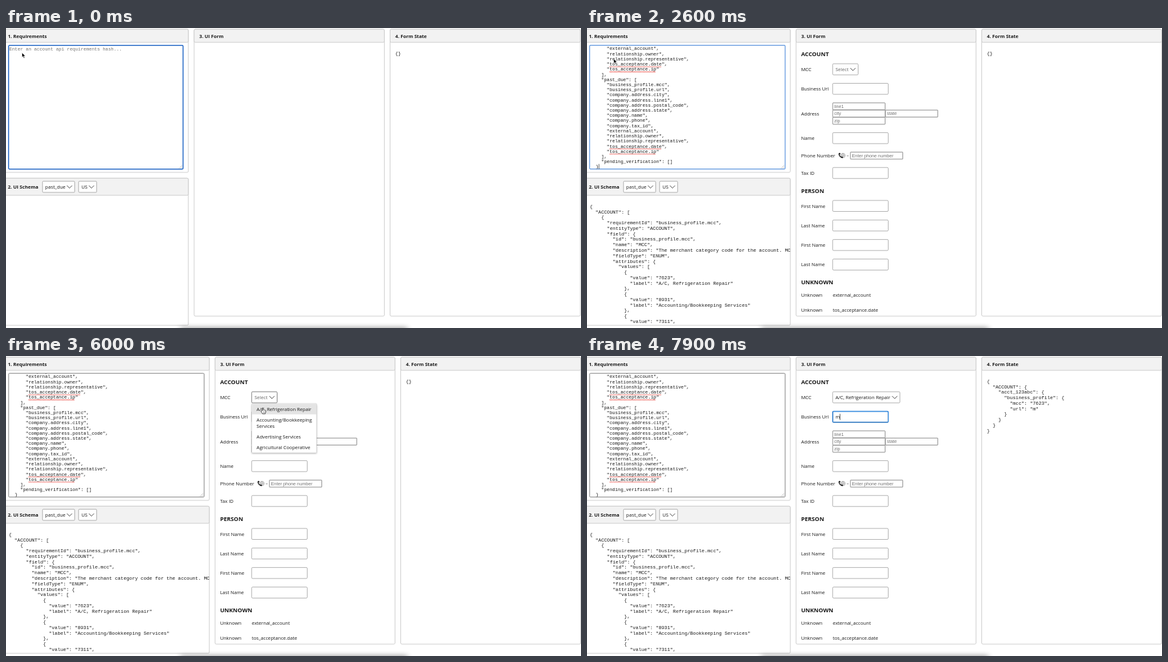
Write an HTML page that moves like this. It is 917 by 480 pixels and loops after 8000 ms.

```html
<!DOCTYPE html>
<html lang="en">
<head>
<meta charset="utf-8">
<title>Requirements form</title>
<style>
html, body { margin: 0; width: 100%; height: 100%; overflow: hidden; background: #fff; }
svg { display: block; width: 917px; height: 480px; }
text { white-space: pre; font: 7.63px "Open Sans", "Noto Sans", sans-serif; fill: #1a1a1a; }
.b { font-weight: 700; }
.h { font-weight: 700; font-size: 9.16px; }
.m { font-family: "Liberation Mono", monospace; }
.ta { font-size: 7.3px; }
.p { font: 7.27px "Liberation Sans", sans-serif; fill: #757575; }
.g { fill: #666; }
</style>
</head>
<body>
<svg id="stage" viewBox="0 0 917 480" xmlns="http://www.w3.org/2000/svg">
<defs>
  <clipPath id="areaClip"><rect x="4.5" y="28.2" width="311" height="197.3"/></clipPath>
  <clipPath id="schemaClip"><rect x="0" y="268" width="324" height="207.3"/></clipPath>
  <filter id="blur" x="-20%" y="-200%" width="140%" height="500%"><feGaussianBlur stdDeviation="5 3.5"/></filter>
  <filter id="soft" x="-10%" y="-10%" width="120%" height="125%"><feGaussianBlur stdDeviation="1.6"/></filter>
</defs>
</svg>
<script>
const LOOP = 8000;
const stage = document.getElementById("stage");

function add(parent, tag, attrs, content) {
  const el = document.createElementNS("http://www.w3.org/2000/svg", tag);
  for (const k in attrs) el.setAttribute(k, attrs[k]);
  if (content !== undefined) el.textContent = content;
  parent.appendChild(el);
  return el;
}
const group = (parent, attrs = {}) => add(parent, "g", attrs);
const text = (parent, x, y, s, cls = "") => add(parent, "text", { x, y, class: cls }, s);
const path = (parent, d, attrs) => add(parent, "path", Object.assign({ d, fill: "none" }, attrs));
const box = (parent, x, y, width, height, stroke, sw = 0.7, rx = 1.5, fill = "#fff") =>
  add(parent, "rect", { x, y, width, height, stroke, "stroke-width": sw, rx, fill });
const show = (el, on) => el.setAttribute("visibility", on ? "visible" : "hidden");
const fade = (el, o) => el.setAttribute("opacity", o);
const ramp = (t, a, b) => Math.max(0, Math.min(1, (t - a) / (b - a)));

function lines(parent, x, y, step, list, cls) {
  list.forEach((s, i) => text(parent, x, y + i * step, s, cls));
}

function panel(parent, x, y, w, h, head, title) {
  box(parent, x, y, w, h, "#c8c8c8", 0.9, 2);
  box(parent, x, y, w, head, "#c8c8c8", 0.9, 2, "#f2f2f2");
  text(parent, Math.max(x, -4) + 8.3 - (x < 0 ? 3.3 : 0), y + head / 2 + 3, title, "b");
}

function select(parent, x, y, w, label, cls) {
  const g = group(parent);
  const frame = box(g, x, y, w, 17.8, "#8c8c8c");
  text(g, x + 4.4, y + 11.7, label, cls);
  path(g, `M${x + w - 12.4} ${y + 6.9}l4.1 4.1 4.1-4.1`, { stroke: "#333", "stroke-width": 0.9 });
  return { g, frame };
}

function plainInput(parent, x, y, label) {
  box(parent, x, y, 83.5, 11.2, "#6e6e6e", 0.8, 0.5);
  text(parent, x + 2.4, y + 8.1, label, "p");
}

function grip(parent, x) {
  path(parent, `M${x - 6} 224.6l5-5M${x - 3.2} 224.6l2.2-2.2`, { stroke: "#999", "stroke-width": 0.6 });
}

// Layout shared by both views: left panel edge and the two right panels
function layout(parent, edge, x3, x4, w) {
  panel(parent, -2, 2, edge + 2, 229, 21, "1. Requirements");
  panel(parent, -2, 240.3, edge + 2, 235.4, 27.4, "2. UI Schema");
  select(parent, 58.2, 245.2, 51.4, "past_due");
  select(parent, 115.8, 245.2, 28.8, "US");
  panel(parent, x3, 2, w, 459, 21, "3. UI Form");
  panel(parent, x4, 2, w, 459, 21, "4. Form State");
}

// Empty view
const empty = group(stage);
layout(empty, 290.8, 300, 612.5, 303.4);
box(empty, 4.2, 27.7, 278.2, 198, "#1d63c4", 1.5, 1.5);
grip(empty, 282);
text(empty, 5.3, 35.8, "Enter an account api requirements hash...", "m ta p0").style.fill = "#757575";
text(empty, 620.8, 42.8, "{}", "m");
const caret0 = add(empty, "rect", { x: 5, y: 29.2, width: 0.7, height: 8.6, fill: "#111" });

// Filled view
const full = group(stage);
layout(full, 324.2, 333.4, 629.5, 287);
const area = box(full, 4.2, 27.7, 311.8, 198, "#777", 0.9, 1.5);
grip(full, 315.6);

const keys = [
  "business_profile.mcc", "business_profile.url", "company.address.city", "company.address.line1",
  "company.address.postal_code", "company.address.state", "company.name", "company.phone",
  "company.tax_id", "external_account", "relationship.owner", "relationship.representative",
  "tos_acceptance.date", "tos_acceptance.ip"
].map((s, i, a) => `      "${s}"${i < a.length - 1 ? "," : ""}`);
const areaText = group(full, { "clip-path": "url(#areaClip)" });
const areaStep = 8.22, areaTop = 35.4;
lines(areaText, 5.3, areaTop - areaStep, areaStep, [
  ...keys.slice(8), "    ],", '    "past_due": [', ...keys, "    ],", '    "pending_verification": []', "  }"
], "m ta");
const caret1 = add(full, "rect", { x: 18.7, y: 217.6, width: 0.7, height: 8, fill: "#111" });
const thumb = add(full, "rect", { x: 310.4, y: 133.5, width: 4.2, height: 82, rx: 2.1, fill: "#000" });

const spelling = group(full);
[[3, 19], [4, 17], [19, 19], [20, 17]].forEach(([row, n]) => {
  const y = areaTop + row * areaStep + 1.9;
  path(spelling, `M36.6 ${y}h${n * 4.38 - 1.5}`, {
    stroke: "#e8281e", "stroke-width": 1.15, "stroke-linecap": "round", "stroke-dasharray": "0.6 1.7"
  });
});

const schema = group(full, { "clip-path": "url(#schemaClip)" });
const entry = (code, label) => [
  "          {", `            "value": "${code}",`, `            "label": "${label}"`, "          },"
];
lines(schema, 4.4, 287.9, 8.76, [
  "{", '  "ACCOUNT": [', "    {",
  '      "requirementId": "business_profile.mcc",',
  '      "entityType": "ACCOUNT",',
  '      "field": {',
  '        "id": "business_profile.mcc",',
  '        "name": "MCC",',
  '        "description": "The merchant category code for the account. MCCs are used',
  '        "fieldType": "ENUM",',
  '        "attributes": {',
  '          "values": ['
], "m");
lines(schema, 4.4 + 9.16, 287.9 + 12 * 8.76, 8.76, [
  ...entry("7623", "A/C, Refrigeration Repair"),
  ...entry("8931", "Accounting/Bookkeeping Services"),
  ...entry("7311", "Advertising Services")
], "m");

// Form
[["ACCOUNT", 45.4], ["PERSON", 264], ["UNKNOWN", 410.4]].forEach(([s, y]) => text(full, 341.4, y, s, "h"));
[["MCC", 66], ["Business Url", 97.3], ["Address", 137], ["Name", 176.2], ["Phone Number", 204.2], ["Tax ID", 232],
 ["First Name", 284.7], ["Last Name", 316], ["First Name", 347.2], ["Last Name", 378.5],
 ["Unknown", 427.5], ["Unknown", 451]].forEach(([s, y]) => text(full, 341.4, y + 2.8, s));
text(full, 392, 430.3, "external_account");
text(full, 392, 453.8, "tos_acceptance.date");
const field = y => box(full, 391.8, y - 8.8, 88.6, 17.6, "#8c8c8c");
[176.2, 232, 284.7, 316, 347.2, 378.5].forEach(field);
const urlBox = field(97.3);
const urlRing = box(full, 391.9, 88.6, 88.6, 17.4, "#3f8fe0", 1.6, 1.5, "none");
const urlText = text(full, 396.2, 100, "m");
const caret2 = add(full, "rect", { x: 396, y: 92.5, width: 0.7, height: 10, fill: "#111" });

plainInput(full, 391.9, 119.8, "line1");
plainInput(full, 391.9, 131.3, "city");
plainInput(full, 475.9, 131.3, "state");
plainInput(full, 391.9, 142.8, "zip");
plainInput(full, 420.1, 198.6, "Enter phone number");

// Phone and globe icon
add(full, "circle", { cx: 408.2, cy: 204, r: 3.6, fill: "#eee", stroke: "#888", "stroke-width": 0.6 });
path(full, "M404.8 204h6.9M408.2 200.5v7M408.2 200.5q-3.4 3.5 0 7M408.2 200.5q3.4 3.5 0 7", { stroke: "#999", "stroke-width": 0.5 });
path(full, "M402 200.8q-.4 5 5.2 6.8", { stroke: "#222", "stroke-width": 1.5 });
path(full, "M402.2 200.2l1.4 2M405.8 206l2 1.6", { stroke: "#222", "stroke-width": 2.1 });
path(full, "M414.4 204.6h2.8", { stroke: "#888", "stroke-width": 0.9 });

const pick = select(full, 391.8, 57.2, 40.6, "Select", "g");
const picked = select(full, 391.8, 57.2, 107.2, "A/C, Refrigeration Repair");

// Dropdown list
const menu = group(full);
add(menu, "rect", { x: 392, y: 78, width: 103.4, height: 78, fill: "#000", opacity: 0.3, filter: "url(#soft)" });
box(menu, 391.9, 76, 103.4, 79, "#c4c4c4", 0.6, 1);
add(menu, "rect", { x: 392.2, y: 76.4, width: 102.8, height: 17, fill: "#e4e4e4" });
[["A/C, Refrigeration Repair", 87.8], ["Accounting/Bookkeeping", 104.8], ["Services", 115.2],
 ["Advertising Services", 132], ["Agricultural Cooperative", 149]].forEach(([s, y]) => text(menu, 399.6, y, s));

// Form state
const stateText = body => {
  const g = group(full);
  lines(g, 637.8, 42.8, 8.76, body, "m");
  return g;
};
const nested = props => [
  "{", '  "ACCOUNT": {', '    "acct_123abc": {', '      "business_profile": {',
  ...props.map(s => "        " + s), "      }", "    }", "  }", "}"
];
const states = [["{}"], nested(['"mcc": "7623"']), nested(['"mcc": "7623",', '"url": "m"'])].map(stateText);

// Shadow at the lower edge
add(stage, "rect", { x: 278, y: 478, width: 362, height: 16, fill: "#000", opacity: 0.3, filter: "url(#blur)" });

// Pointers, each with its hot spot at 0,0
const arrow = group(stage);
path(arrow, "M0 0v7.4l1.7-1.6 1.3 3 1.3-.6-1.3-2.8h2.4z", { fill: "#000", stroke: "#fff", "stroke-width": 0.6 });
const hand = group(stage);
path(hand, "M-.9 4.6V.7a.8.8 0 0 1 1.6 0v2.5q.8-.5 1.5.1 .8-.3 1.4.3 1.2-.1 1.2 1.1v1.6q0 1.2-.9 2.2v.8h-4.3q-.3-1.2-2.5-3.6 .1-1.4 2-1.1z",
  { fill: "#fff", stroke: "#000", "stroke-width": 0.7 });
path(hand, "M1 5.6v2M2.2 5.6v2M3.4 5.6v2", { stroke: "#000", "stroke-width": 0.4 });
const beam = group(stage);
path(beam, "M-1.6-3.6q1.6 0 1.6.9 0-.9 1.6-.9M0-3V3M-1.6 3.6q1.6 0 1.6-.9 0 .9 1.6.9M-.8 1h1.6", { stroke: "#111", "stroke-width": 0.8 });

const track = [
  [0, 25.5, 39.5], [100, 25.5, 39.5], [800, 42.6, 49.2], [2800, 42.6, 49.2], [3000, 180, 30], [3100, 309, 38],
  [3200, 309, 38], [4100, 367, 62], [4200, 381, 64.6], [4600, 408, 67], [5200, 408, 67], [5700, 409.5, 83.2],
  [6300, 409.5, 83.2], [6700, 413.2, 94], [LOOP, 413.2, 94]
];

function pointerAt(t) {
  const i = track.findIndex((k, n) => n && t <= k[0]);
  const [ta, xa, ya] = track[i - 1], [tb, xb, yb] = track[i];
  const u = (t - ta) / (tb - ta);
  return [xa + (xb - xa) * u, ya + (yb - ya) * u];
}

function render(now) {
  const t = Math.floor((now % LOOP) / 100) * 100;
  const between = (a, b) => t >= a && t < b;
  const filled = t >= 1600;
  empty.style.display = filled ? "none" : "";
  full.style.display = filled ? "" : "none";

  const blurred = t >= 4600;
  area.setAttribute("stroke", blurred ? "#6e6e6e" : "#5590dc");
  area.setAttribute("stroke-width", blurred ? 0.9 : 1.2);
  show(caret0, between(300, 800) || between(1300, 1600));
  show(caret1, between(1600, 2000) || between(2500, 3000) || between(3500, 4000));
  fade(thumb, t < 1700 ? 0 : 0.5 * (1 - ramp(t, 2100, 2300)));
  show(spelling, t >= 2600);

  const chosen = t >= 6300;
  show(pick.g, !chosen);
  show(picked.g, chosen);
  pick.frame.setAttribute("stroke", blurred ? "#444" : "#8c8c8c");
  fade(menu, ramp(t, 4800, 5000) * (1 - ramp(t, 6200, 6400)));

  const typed = t >= 7700;
  const step = typed ? 2 : chosen ? 1 : 0;
  states.forEach((g, i) => show(g, i === step));
  const active = t >= 6800;
  urlBox.setAttribute("stroke", active ? "#222" : "#8c8c8c");
  urlBox.setAttribute("stroke-width", active ? 1 : 0.7);
  fade(urlRing, ramp(t, 7000, 7300));
  show(urlText, typed);
  show(caret2, between(7000, 7500) || typed);
  caret2.setAttribute("x", typed ? 403.2 : 396);

  const [x, y] = pointerAt(t);
  const overList = x > 392 && t < 6400;
  const overField = t >= 6600;
  [[arrow, !overList && !overField], [hand, overList], [beam, overField && !typed]].forEach(([el, on]) => {
    show(el, on);
    el.setAttribute("transform", `translate(${x} ${y})`);
  });
}

const start = performance.now();
function tick() {
  render(performance.now() - start);
  requestAnimationFrame(tick);
}
tick();
</script>
</body>
</html>
```
